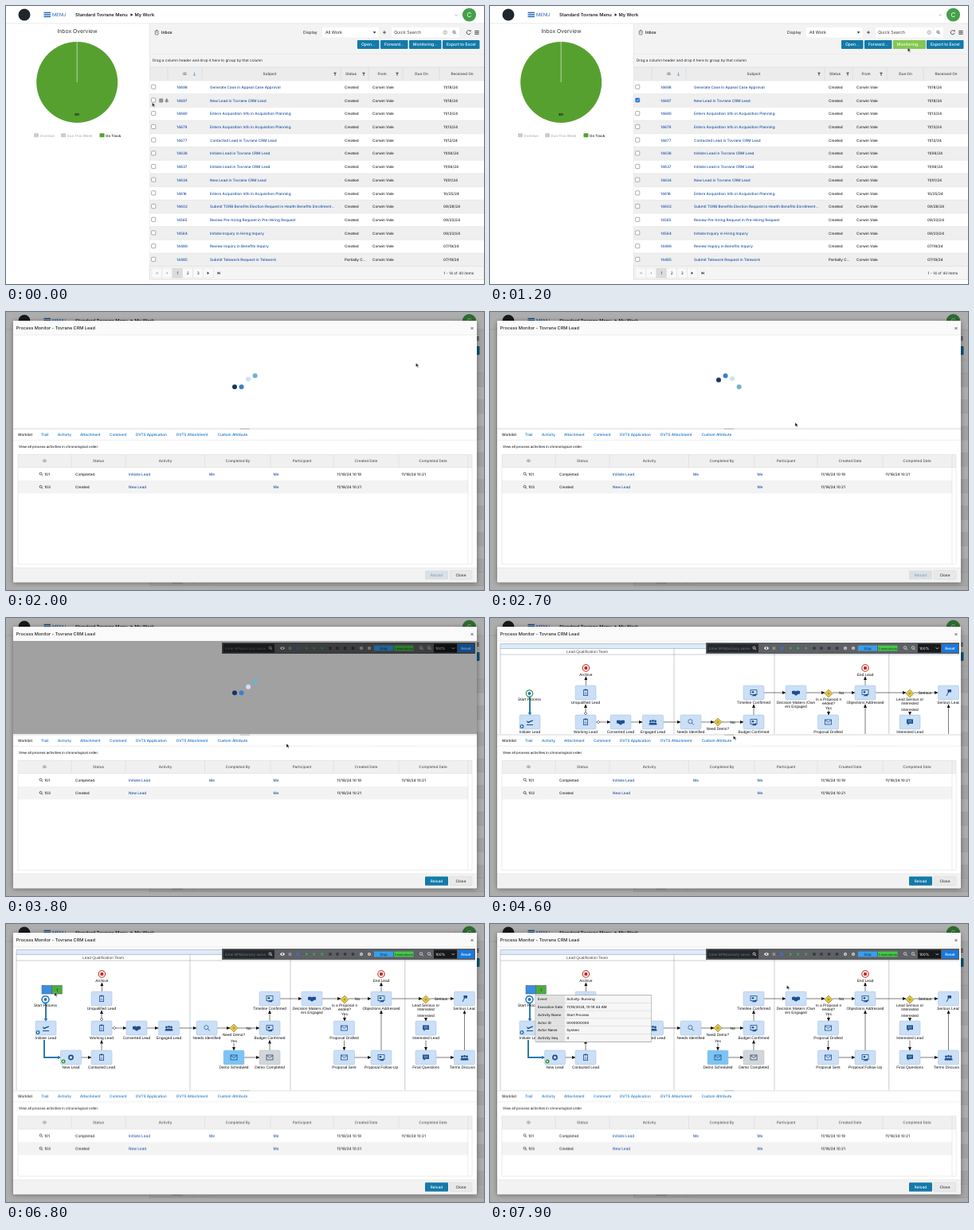
These frames come from a looping animation (600x350 px, 8 s). An HTML page:

```html
<!DOCTYPE html>
<html lang="en">
<head>
<meta charset="utf-8">
<title>Process monitor</title>
<style>
html, body { margin: 0; width: 100%; height: 100%; overflow: hidden; background: #fff; }
svg { display: block; width: 600px; height: 350px; font-family: Inter, Roboto, sans-serif; text-rendering: geometricPrecision; }
text { white-space: pre; }
#flow { font-family: "Liberation Sans", Arial, sans-serif; }
#lower, #details { font-weight: 500; }
.window { filter: drop-shadow(0 1px 3px rgba(0, 0, 0, .4)); }
#cursor { animation: cursor 8s ease-in-out infinite; }
#lower { animation: resize 8s step-end infinite; }
.bar { animation: drag 8s ease-in-out infinite; }
.dot { animation: hop .88889s infinite; }
@keyframes cursor {
  0%, 6% { transform: translate(183.5px, 121.5px); }
  16%, 23% { transform: translate(531px, 51px); }
  25% { transform: translate(514.5px, 64px); }
  32% { transform: translate(430px, 125px); }
  38% { transform: translate(168px, 203px); }
  47.5% { transform: translate(352px, 158px); }
  57.5%, 60% { transform: translate(305.5px, 148px); }
  68.75% { transform: translate(303px, 210.5px); }
  71.25%, 73% { transform: translate(301.5px, 271px); }
  80.5%, 83% { transform: translate(50px, 95px); }
  86%, 91% { transform: translate(64px, 83px); }
  98.5%, 100% { transform: translate(372.5px, 77px); }
}
@keyframes resize {
  0% { transform: translateY(0); }
  69.4%, 100% { transform: translateY(62.5px); }
}
@keyframes drag {
  0%, 60% { transform: translateY(0); }
  68.75%, 100% { transform: translateY(62.5px); }
}
@keyframes hop {
  0% { transform: translateY(0); animation-timing-function: cubic-bezier(.33, .67, .67, 1); }
  20% { transform: translateY(-14px); animation-timing-function: cubic-bezier(.33, 0, .67, .33); }
  40%, 100% { transform: translateY(0); }
}
</style>
</head>
<body>
<svg viewBox="0 0 600 350">
  <defs>
    <marker id="tip" markerWidth="5" markerHeight="4" refX="4" refY="2" orient="auto" markerUnits="userSpaceOnUse">
      <path d="M0 0L4.5 2L0 4Z" fill="#111"/>
    </marker>
    <marker id="tipBlue" markerWidth="5" markerHeight="5" refX="3.5" refY="2.5" orient="auto" markerUnits="userSpaceOnUse">
      <path d="M0 0L4.5 2.5L0 5Z" fill="#2d7ba8"/>
    </marker>
    <clipPath id="pane"><rect x="12" y="31" width="577" height="178"/></clipPath>
    <clipPath id="body"><rect x="9" y="29" width="582" height="295"/></clipPath>
  </defs>
  <g id="page"></g>
  <g id="checked"></g>
  <g id="rowIcons"></g>
  <g id="hotButton"></g>
  <g id="busy"></g>
  <g id="modal">
    <g id="frame"></g>
    <g id="flow" clip-path="url(#pane)"></g>
    <g id="toolbar"></g>
    <g id="paneDim"></g>
    <g id="paneLoader"></g>
    <g clip-path="url(#body)"><g id="lower"></g></g>
    <g id="ghost"></g>
    <g id="footer"></g>
    <g id="reload"></g>
    <g id="chips"></g>
    <g id="details"></g>
  </g>
  <g id="cursor">
    <path d="M0 0V5.2L1.3 4.1L2.2 6L3.2 5.5L2.3 3.7H3.9Z" fill="#000" stroke="#fff" stroke-width=".5"/>
  </g>
</svg>
<script>
const LINK = '#1a50a5', BLUE = '#137aa9', DARK = '#222';
const rect = (x, y, w, h, fill, more = '') => `<rect x="${x}" y="${y}" width="${w}" height="${h}" fill="${fill}" ${more}/>`;
const disc = (x, y, r, fill, more = '') => `<circle cx="${x}" cy="${y}" r="${r}" fill="${fill}" ${more}/>`;
const path = (d, stroke, w = .6, more = '') => `<path d="${d}" fill="none" stroke="${stroke}" stroke-width="${w}" ${more}/>`;
const fillPath = (d, fill) => `<path d="${d}" fill="${fill}"/>`;
const text = (x, y, size, str, fill = DARK, more = '') => `<text x="${x}" y="${y}" font-size="${size}" fill="${fill}" ${more}>${str}</text>`;
const MID = 'text-anchor="middle"', SEMI = 'font-weight="600"', MED = 'font-weight="500"';
const mid = (x, y, size, str, fill, more = '') => text(x, y, size, str, fill, MID + ' ' + more);
const lens = (x, y, c, r = 1.5) => disc(x, y, r, 'none', `stroke="${c}" stroke-width=".7"`) + path(`M${x + r * .7} ${y + r * .7}l${r} ${r}`, c, .8);
const put = (id, ...parts) => document.getElementById(id).innerHTML = parts.flat().join('');
const range = (n, f) => Array.from({ length: n }, (_, i) => f(i));

// Four hopping dots; start is the moment the first one leaves the ground.
const loader = (y, start) => ['#15365f', '#3d7fc6', '#cbe2f5', '#6cb3d3'].map((c, i) =>
  `<g class="dot" style="animation-delay:${start + i * 100 - 1778}ms">${disc(287 + i * 8.55, y, 3, c)}</g>`);

// ---- Inbox page ----
const subjects = [
  ['14698', 'Generate Case in Appeal Case Approval', '11/18/24'],
  ['14697', 'New Lead in Tovrane CRM Lead', '11/18/24'],
  ['14680', 'Enters Acquisition Info in Acquisition Planning', '11/13/24'],
  ['14679', 'Enters Acquisition Info in Acquisition Planning', '11/13/24'],
  ['14677', 'Contacted Lead in Tovrane CRM Lead', '11/12/24'],
  ['14638', 'Initiate Lead in Tovrane CRM Lead', '11/06/24'],
  ['14637', 'Initiate Lead in Tovrane CRM Lead', '11/06/24'],
  ['14634', 'New Lead in Tovrane CRM Lead', '11/01/24'],
  ['14616', 'Enters Acquisition Info in Acquisition Planning', '10/25/24'],
  ['14602', 'Submit TORB Benefits Election Request in Health Benefits Enrollment...', '09/28/24'],
  ['14565', 'Review Pre-hiring Request in Pre-Hiring Request', '09/23/24'],
  ['14564', 'Initiate Inquiry in Hiring Inquiry', '09/23/24'],
  ['14486', 'Review Inquiry in Benefits Inquiry', '07/19/24'],
  ['14485', 'Submit Telework Request in Telework', '07/19/24']
];
const PITCH = 16.7;
const row = ([id, subject, date], i) => {
  const top = 94 + i * PITCH, y = top + 9.9;
  return rect(180.5, top, 420, PITCH, i % 2 ? '#efefef' : '#fff') +
    path(`M180.5 ${top}H600`, '#dedede', .5) +
    rect(182.6, top + 5.2, 5.2, 5.2, '#fff', 'rx=".8" stroke="#777" stroke-width=".6"') +
    text(214, y, 4.65, id, LINK, MED) + text(256, y, 4.65, subject, LINK, MED) +
    text(425, y, 4.65, i === 13 ? 'Partially C...' : 'Created', DARK, MED) +
    text(460, y, 4.65, 'Corwin Vale', DARK, MED) + text(549, y, 4.65, date, DARK, MED);
};
const button = (x, w, label, fill = BLUE) =>
  rect(x, 43, w, 11, fill, 'rx="1"') + mid(x + w / 2, 50.3, 5.1, label, '#fff', MED);
const funnel = x => fillPath(`M${x - 2} 83.8h4l-1.5 2v2.2l-1-.6v-1.6z`, '#555');
const legend = (x, label, fill, ink) => rect(x, 160.3, 6, 5, fill, 'rx=".8"') + text(x + 7.6, 164.5, 4.4, label, ink, SEMI);

put('page',
  rect(0, 0, 600, 350, '#fff'),
  disc(23, 11, 7.5, '#20262b'),
  range(3, i => rect(47.5, 7.7 + i * 2.5, 8.5, 1.4, '#1b62b7')),
  text(58, 13.2, 5.8, 'MENU', '#1b62b7'),
  text(87, 13.2, 5.7, 'Standard Tovrane Menu', '#222', SEMI),
  fillPath('M156.5 9.2l3 1.9l-3 1.9z', '#222'),
  text(161.5, 13.2, 5.7, 'My Work', '#222', SEMI),
  path('M563.5 10.5l1.8 1.8l1.8-1.8', '#888'),
  disc(581.5, 11, 8.6, '#45a049'), mid(581.5, 14, 8, 'C', '#fff'),
  mid(89.5, 33.6, 6.8, 'Inbox Overview', '#333'),
  disc(89.2, 96, 51, '#56a030'), path('M89.2 45V96', '#e4f0dc', .7),
  mid(89, 138, 4.3, '40', '#111', 'font-weight="700"'),
  legend(35, 'Overdue', '#ccc', '#bbb'), legend(69, 'Due This Week', '#ccc', '#bbb'), legend(117.5, 'On Track', '#56a030', '#333'),
  rect(180, 22, 420, 322.5, '#f3f3f3'), path('M0 22H600M180.3 22V344.5', '#ddd', .6),
  rect(187.3, 31, 3.8, 5, 'none', 'rx=".6" stroke="#555" stroke-width=".7"'), path('M188.4 30.5h1.6M188.5 33h1.4', '#555', .8),
  text(195, 35.1, 5.1, 'Inbox', '#222', SEMI), text(373, 35.1, 5.1, 'Display'),
  rect(397, 27, 70.5, 12.6, '#fff', 'rx="1"'), text(401, 35.3, 5.3, 'All Work'), fillPath('M460.8 32.3h3.6l-1.8 2.4z', '#333'),
  path('M473 33.2h4M475 31.2v4', '#333', .8),
  rect(484, 27, 72, 12.6, '#fff', 'rx="1"'), text(487, 35.2, 5.4, 'Quick Search', '#444'),
  disc(551.3, 33.3, 2.2, 'none', 'stroke="#666" stroke-width=".5"'), path('M551.3 32.8v1.6M551.3 31.8v.5', '#555', .5),
  rect(557, 27, 12, 12.6, '#fff', 'rx="1"'), lens(562.3, 32.7, '#333'),
  path('M582.6 31.6a2.5 2.5 0 1 0 .6 2', '#333', .8), fillPath('M581.6 31.8l2 .2v-2z', '#333'),
  range(3, i => rect(588.3, 31 + i * 1.9, 5.4, .9, '#333')),
  button(441, 27.5, 'Open...'), button(470, 34.5, 'Forward...'), button(506, 40.5, 'Monitoring...'), button(548, 46.5, 'Export to Excel'),
  path('M180 60.5H600', '#e2e2e2', .5),
  text(184, 70.3, 4.65, 'Drag a column header and drop it here to group by that column'),
  rect(180.5, 77, 420, 17, '#ececec'), path('M180.5 77H600M203 77V94M246 77V94M420 77V94M455 77V94M498 77V94M544 77V94', '#d2d2d2', .5),
  [[224.5, 'ID'], [331, 'Subject'], [433, 'Status'], [472, 'From'], [521.5, 'Due On'], [572.5, 'Received On']]
    .map(([x, s]) => mid(x, 87.4, 4.65, s, '#444', MED)),
  path('M236.5 83.5v4.3m-1.3-1.4l1.3 1.4l1.3-1.4', '#2a7fd0'), [413, 449, 491].map(funnel),
  subjects.map(row),
  rect(180.5, 327.8, 419.5, 16.7, '#f5f5f5', 'stroke="#d6d6d6" stroke-width=".5"'),
  range(6, i => rect(183 + i * 12.9, 330, 12.9, 12.6, i === 2 ? '#dcdcdc' : '#f9f9f9', 'stroke="#dedede" stroke-width=".5"')),
  fillPath('M190.8 334.8v3l-2.2-1.5zM188.2 334.8h.5v3h-.5zM203 334.8v3l-2.2-1.5z', '#bbb'),
  fillPath('M252.6 334.6v3.4l2.5-1.7zM265.6 334.6v3.4l2.5-1.7zM268.2 334.6h.6v3.4h-.6z', '#333'),
  ['1', '2', '3'].map((n, i) => mid(215.4 + i * 12.9, 338, 4.8, n)),
  text(549.5, 338, 4.65, '1 - 14 of 40 items')
);
put('checked', rect(182.6, 115.9, 5.2, 5.2, '#1a73e8', 'rx=".8"'), path('M183.7 118.5l1.1 1.2l2-2.4', '#fff', .8));
put('rowIcons', rect(192.2, 116.4, 5, 5, '#8a8a8a', 'rx="1"'), path('M193.3 118.2h2.8M193.3 119.7h2.8', '#bbb', .4),
  fillPath('M201.7 115.8l2.6 4.6h-2v1.4h-1.2v-1.4h-2z', '#8a8a8a'));
put('hotButton', button(506, 40.5, 'Monitoring...', '#83c750'));
put('busy', rect(0, 0, 600, 350, '#000', 'opacity=".18"'), loader(182.3, 1333));

// ---- Monitor window ----
put('frame',
  rect(0, 0, 600, 350, '#000', 'opacity=".32"'),
  rect(9, 11, 582, 329.3, '#fff', 'rx="1.2" class="window"'),
  rect(9, 11, 582, 18, '#fafafa', 'rx="1.2"'), path('M9 29H591', '#ddd', .5),
  text(12.8, 22.3, 5.55, 'Process Monitor - Tovrane CRM Lead', '#222', MED),
  path('M583.5 19l3 3m0-3l-3 3', '#333', .7)
);
put('paneLoader', loader(94.3, 1525));

const headers = [[48.5, 'ID'], [116, 'Status'], [200, 'Activity'], [291, 'Completed By'], [371.5, 'Participant'], [452, 'Created Date'], [536, 'Completed Date']];
const tabs = [[44, 'Trail'], [65, 'Activity'], [93, 'Attachment'], [130, 'Comment'], [163, 'DVTS Application'], [214, 'DVTS Attachment'], [265.5, 'Custom Attribute']];
const logRow = (y, id, status, activity, by, made, done) => lens(43.6, y - 2, '#333') + text(48.2, y, 4.65, id) +
  text(87, y, 4.65, status) + text(154, y, 4.65, activity, LINK) + text(255, y, 4.65, by, LINK) +
  text(335.5, y, 4.65, 'Me', LINK) + text(415.5, y, 4.65, made) + text(496.5, y, 4.65, done);
put('lower',
  rect(9, 146, 582, 194, '#fff'), rect(9, 146, 582, 2.2, '#ececec'), rect(294, 146.6, 12, 1, '#b5b5b5'),
  path('M9 161.3H591', '#dcdcdc', .5),
  text(15, 156.3, 4.65, 'Worklist'), tabs.map(([x, s]) => text(x, 156.3, 4.65, s, '#0b6bc4')),
  text(16, 171.4, 4.3, 'View all process activities in chronological order.'),
  rect(15, 179.5, 570, 16, '#f0f0f0'), headers.map(([x, s]) => mid(x, 189.2, 4.6, s, '#555')),
  rect(15, 212, 565, 16.4, '#f3f3f3'),
  `<g id="rowHover">${rect(15, 195.5, 565, 16.5, '#ebebeb')}</g>`,
  path('M15 330V179.5H585V330M15 195.5H585M580 179.5V330', '#d5d5d5', .5),
  path('M82 179.5v16M150 179.5v16M249.5 179.5v16M332 179.5v16M411 179.5v16M493 179.5v16', '#d5d5d5', .5),
  logRow(205.5, '101', 'Completed', 'Initiate Lead', 'Me', '11/18/24 10:19', '11/18/24 10:21'),
  logRow(221.9, '103', 'Created', 'New Lead', '', '11/18/24 10:21', '')
);
// The splitter drags as a thin bar; the panes resize when it is dropped.
put('ghost', rect(9, 146, 582, 2.2, '#b9b9b9', 'class="bar"'));
put('footer',
  rect(9, 317.3, 582, 5, '#fff'), path('M15 317.3H585', '#d5d5d5', .5),
  rect(9, 322, 582, 18.3, '#f2f2f2', 'rx="1"'), path('M9 322H591', '#ddd', .5),
  rect(526, 325.5, 29, 11.2, '#d9e0e6', 'rx="1"'), mid(540.5, 332.9, 4.75, 'Reload', '#8c979f'),
  rect(557, 325.5, 28, 11.2, '#e9e9e9', 'rx="1" stroke="#d5d5d5" stroke-width=".5"'), mid(571, 332.9, 4.75, 'Close', '#333', MED)
);
put('reload', rect(526, 325.5, 29, 11.2, BLUE, 'rx="1"'), mid(540.5, 332.9, 4.75, 'Reload', '#fff', MED));

// ---- Process diagram ----
const INK = '#1d4f91';
const glyphs = {
  clip: (x, y) => rect(x - 2.6, y - 3.4, 5.2, 7, 'none', `stroke="${INK}" stroke-width=".8"`) + rect(x - 1.3, y - 4.4, 2.6, 1.8, INK) + path(`M${x - 1.3} ${y}h2.6m-2.6 1.6h2.6`, INK, .5),
  mail: (x, y) => rect(x - 4, y - 3, 8, 6, 'none', `stroke="${INK}" stroke-width=".8"`) + path(`M${x - 4} ${y - 2.6}l4 3l4-3`, INK, .8),
  find: (x, y) => lens(x - .6, y - .8, INK, 2.6),
  team: (x, y) => [-3, 3, 0].map(d => disc(x + d, y - 1.6 + Math.abs(d) / 6, 1.4, INK) + fillPath(`M${x + d - 2} ${y + 3.4}a2 3 0 0 1 4 0z`, INK)).join(''),
  chat: (x, y) => fillPath(`M${x - 4} ${y - 3.5}h8v5.5h-4.5l-2 2v-2h-1.5z`, INK) + path(`M${x - 2.5} ${y - 1.5}h5m-5 1.6h5`, '#cfe2f7', .5),
  plane: (x, y) => fillPath(`M${x - 4.5} ${y - 2}l2.5 1.4l5-2q1.8 0 1 1l-6.5 3zM${x - 4} ${y + 3}h8v.9h-8z`, INK),
  hands: (x, y) => fillPath(`M${x - 5} ${y - 2}l3 -.5l2 .8l2-.8l3 .5v3.500l-2 .3l-3 2l-3-2l-2-.3z`, INK),
  star: (x, y) => disc(x, y, 3.4, INK) + fillPath(`M${x} ${y - 2.2}l.7 1.5h1.5l-1.2 1l.5 1.6l-1.5-1l-1.5 1l.5-1.6l-1.2-1h1.5z`, '#fff'),
  card: (x, y) => rect(x - 4, y - 3.4, 8, 6, 'none', `stroke="${INK}" stroke-width=".8"`) + disc(x - 1, y - .8, 1.3, INK) + fillPath(`M${x - 3} ${y + 4.2}l6-3v3z`, INK),
  flag: (x, y) => path(`M${x - 2.5} ${y + 4}l4-7.5`, INK, 1) + rect(x - 1, y - 4, 4.5, 3.5, INK)
};
const label = (x, y, s) => mid(x, y, 4.85, s, '#111');
const lane = (x, s) => mid(x, 43.6, 4.85, s, '#444');
const node = ([x, y, icon, name, fill = '#cbdff6']) =>
  rect(x - 13, y - 9, 26, 18, fill, 'rx="1.6" stroke="#a0bce0" stroke-width=".5"') + glyphs[icon](x, y) +
  name.split('|').map((s, i) => label(x, y + 13.6 + i * 5.6, s)).join('');
const gate = (x, y) => fillPath(`M${x} ${y - 5}l5 5l-5 5l-5-5z`, '#e3c74c') + path(`M${x} ${y - 5}l5 5l-5 5l-5-5zM${x - 1.6} ${y}h3.2m-1.6-1.6v3.2`, '#8a7420', .6);
const end = (x, name) => disc(x, 63, 4.2, '#fff', 'stroke="#c0291f" stroke-width="1.1"') + rect(x - 1.9, 61.1, 3.8, 3.8, '#c0291f') + label(x, 72.6, name);
const arrows = pts => pts.map(d => path('M' + d, '#111', .55, 'marker-end="url(#tip)"')).join('');
const tiny = (x, y) => `<path d="M${x - 2} ${y}l2-2l2 2l-2 2z" fill="#fff" stroke="#111" stroke-width=".5"/>`;
const badge = (x, y, c) => disc(x, y, 3, c, 'stroke="#fff" stroke-width=".6"') + fillPath(`M${x - .9} ${y - 1.4}l2.3 1.4l-2.3 1.4z`, '#fff');

put('flow',
  rect(13, 32.3, 576, 6.2, '#dcebfa'),
  path('M13 209V32.5H589M13 38.5H589M13 46H589M231 38.5V209M357 38.5V209M500.8 38.5V209', '#8f98a5', .5),
  lane(122, 'Lead Qualification Team'), lane(294, 'Demo Team'), lane(429, 'Proposal Team'), lane(549, 'Closing Team'),
  arrows(['94 168H107', '120 159V146.5', '133 131H151', '120 122V109', '120.4 85V74', '177 131H191', '217.5 131H239', '265 131H281',
    '291 131H318', '286 150V159', '299 168H318', '331 159V146.5', '331 122V109', '344 94H371', '397 94H420', '430 94H458', '425 115.5V122',
    '424.5 146.5V159', '437 168H458', '471 159V109', '471 85V74', '484 94H522', '532 94H562', '527 118V122', '527 146.5V159', '540 168H562', '575.5 159V109']),
  tiny(136, 131), tiny(120, 120),
  path('M50 99V122', '#2d7ba8', 2, 'marker-end="url(#tipBlue)"'), path('M48 146V168H68', '#2d7ba8', 2, 'marker-end="url(#tipBlue)"'),
  disc(49.5, 95, 4.2, '#fff', 'stroke="#2f9a4a" stroke-width="1.2"'), disc(49.5, 95, 2, '#2a72b5'), label(49.5, 103.6, 'Start Process'),
  end(120.4, 'Archive'), end(471, 'End Lead'),
  [[50, 131, 'plane', 'Initiate Lead'], [120, 94, 'clip', 'Unqualified Lead'], [120, 131, 'clip', 'Working Lead'],
    [164, 131, 'hands', 'Converted Lead'], [204.5, 131, 'team', 'Engaged Lead'], [252, 131, 'find', 'Needs Identified'],
    [331, 131, 'card', 'Budget Confirmed'], [331, 94, 'card', 'Timeline Confirmed'], [384, 94, 'hands', 'Decision Makers /Own|ers Engaged'],
    [424.5, 131, 'mail', 'Proposal Drafted'], [471, 94, 'card', 'Objections Addressed'], [575.5, 94, 'flag', 'Serious Lead'],
    [527, 131, 'chat', 'Interested Lead'], [81.5, 168, 'star', 'New Lead'], [120, 168, 'clip', 'Contacted Lead'],
    [286, 168, 'mail', 'Demo Scheduled', '#7cc4f3'], [331, 168, 'mail', 'Demo Completed', '#d5d5d5'], [424.5, 168, 'mail', 'Proposal Sent'],
    [471, 168, 'card', 'Proposal Follow-Up'], [527, 168, 'chat', 'Final Questions'], [575.5, 168, 'team', 'Terms Discussed']].map(node),
  gate(286, 131), gate(425, 95), gate(527, 95),
  [[286, 140.6, 'Need Demo?'], [286, 148.8, 'Yes'], [304.5, 133, 'No'], [425, 103.6, 'Is a Proposal n'], [425, 109.2, 'eeded?'], [425, 115, 'Yes'],
    [441, 96, 'No'], [527, 103.6, 'Lead Serious or'], [527, 109.2, 'Interested'], [527, 116.8, 'Interested'], [546, 96, 'Serious']].map(a => label(...a)),
  badge(40, 136.5, '#2a72b5'), badge(72, 173, '#2f8f3c')
);

const play = (x, c) => fillPath(`M${x - 1.4} 36l3.2 2l-3.2 2z`, c);
put('toolbar',
  rect(271, 31, 318, 14, '#55585c', 'opacity=".94"'),
  rect(272.5, 32.5, 64.5, 11, '#25282c'), text(275, 39.8, 4.4, 'Enter BPM/activity name', '#75797e'), lens(331.5, 37.5, '#fff'),
  `<ellipse cx="347" cy="38" rx="2.8" ry="1.8" fill="#fff"/>`, disc(347, 38, .9, '#444'),
  rect(354.6, 36.3, 3.6, 3.6, '#8d9297'), rect(364.4, 36.3, 3.6, 3.6, '#3973b8'),
  [377.5, 387, 397].map(x => play(x, '#3fae49')), [407, 416, 425.5, 435.5].map(x => rect(x - 1.6, 36.3, 3.2, 3.4, '#34383c')),
  [446, 456].map(x => disc(x, 38, 2, '#d5d8da') + disc(x, 38, .7, '#555')),
  rect(462, 34.6, 24, 6.8, '#35a0ee'), mid(474, 39.6, 4.4, 'Stop', '#0d2c4a'),
  rect(487, 34.6, 24.5, 6.8, '#45c84a'), mid(499.2, 39.5, 3.9, '3 executions', '#0c330d'),
  lens(521, 37.4, '#eee', 1.7), lens(531, 37.4, '#eee', 1.7),
  rect(537, 32.5, 29, 11, '#17191b'), text(539, 39.8, 4.6, '100%', '#fff'), path('M559.6 37.2l1.8 1.8l1.8-1.8', '#ddd', .8),
  rect(567.3, 33, 20.5, 10.2, '#1779e0', 'rx="1"'), mid(577.5, 39.8, 4.6, 'Reset', '#fff', MED)
);
put('paneDim', rect(9, 29, 582, 117, '#000', 'opacity=".37"'));

put('chips',
  disc(49.5, 95, 4.4, '#fff', 'stroke="#2a7fd0" stroke-width="1.6"'), disc(49.5, 95, 2, '#2a72b5'),
  rect(45, 77.3, 12.3, 10.7, '#3b8fe0', 'stroke="#456" stroke-width=".5"'),
  rect(57.5, 77.3, 12.8, 10.7, '#4cae3c', 'stroke="#456" stroke-width=".5"'), mid(64, 84.5, 4.8, '1', '#111'));
const facts = [['Event', 'Activity: Running'], ['Execution Date', '11/18/2024, 10:19:44 AM'], ['Activity Name', 'Start Process'],
  ['Actor ID', '0000000000'], ['Actor Name', 'System'], ['Activity Seq', '4']];
put('details', rect(57, 89.7, 145.5, 58.6, '#f2f2f2', 'stroke="#8c8c8c" stroke-width=".6"'),
  facts.map(([k, v], i) => {
    const y = 90 + i * 9.75;
    return rect(57.4, y, 36.6, 9.3, '#e2e2e2') + rect(94.4, y, 107.8, 9.3, '#f6f6f6') + path(`M57 ${y + 9.5}H202.5`, '#b4b4b4', .4) +
      text(60, y + 6.4, 4.35, k) + text(96.3, y + 6.4, 4.35, v);
  }));

// Hard on and off times in ms within the 8 s loop.
const shown = {
  checked: [300, 8000], rowIcons: [0, 700], hotButton: [1150, 1950], busy: [1650, 1950], modal: [1950, 8000],
  reload: [3500, 8000], toolbar: [3750, 8000], paneDim: [3750, 4550], paneLoader: [1950, 4550], flow: [4550, 8000],
  ghost: [4800, 5552], rowHover: [5650, 5950], chips: [6500, 8000], details: [6900, 8000]
};
const style = document.createElement('style');
style.textContent = Object.entries(shown).map(([id, [from, to]]) =>
  `@keyframes ${id} { 0% { opacity: 0 } ${from / 80}% { opacity: 1 } ${to / 80}% { opacity: 0 } 100% { opacity: 0 } }
  #${id} { animation: ${id} 8s step-end infinite }`).join('\n');
document.head.append(style);
</script>
</body>
</html>
```
